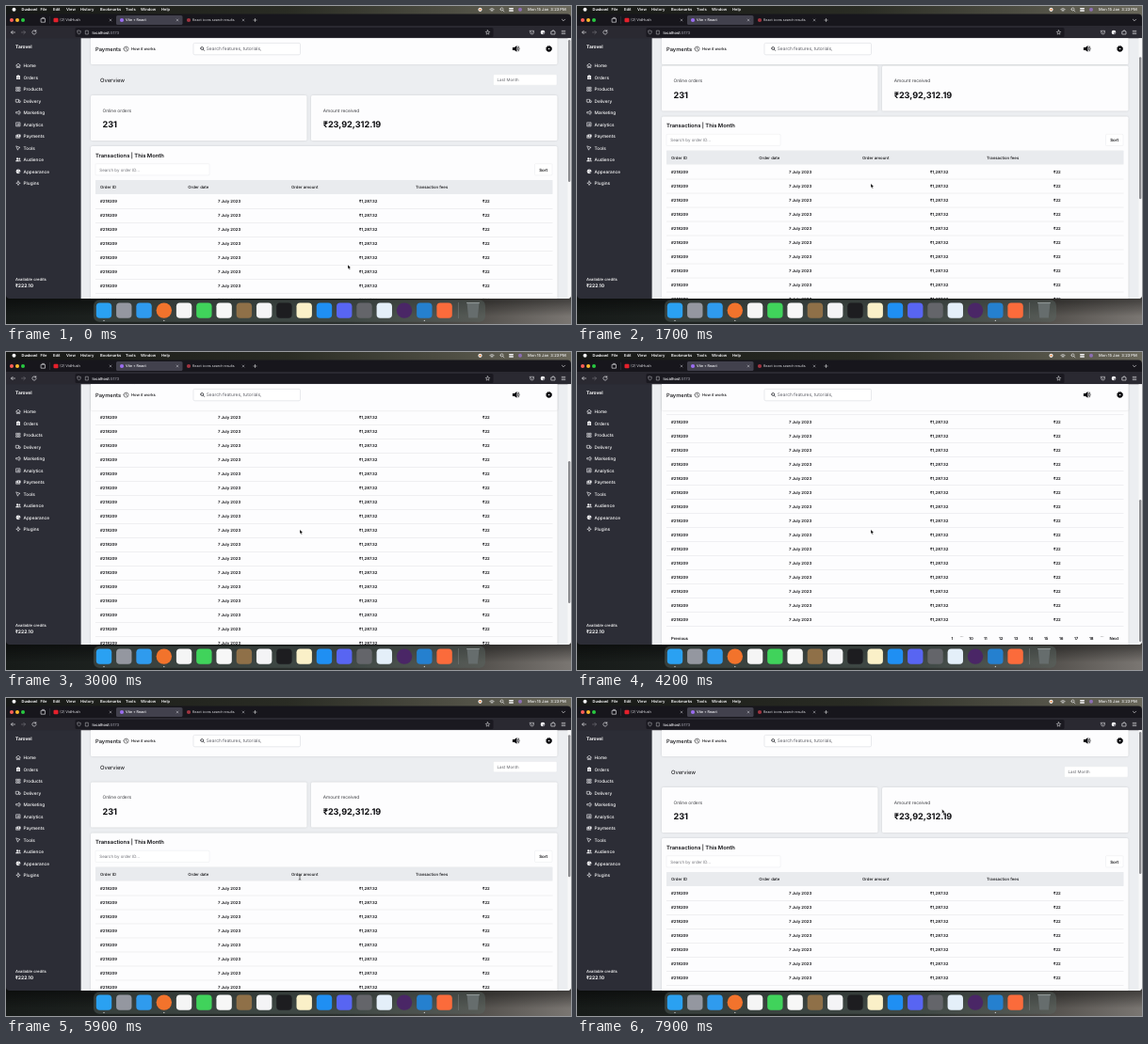
An HTML page that plays this animation: 600x338 px, repeating every 8 s.

```html
<!DOCTYPE html>
<html lang="en">
<head>
<meta charset="utf-8">
<title>Payments dashboard</title>
<style>
  html, body { margin: 0; width: 100%; height: 100%; overflow: hidden; background: #15181a; }
  svg { display: block; width: 100vw; height: 100vh; }
  text { font-family: Inter, "Noto Sans", sans-serif; text-rendering: geometricPrecision; white-space: pre; }
  .card { filter: drop-shadow(0 .5px .8px rgba(0, 0, 0, .13)); }
  .line { fill: none; stroke-linecap: round; stroke-linejoin: round; }
</style>
</head>
<body>
<svg id="stage" viewBox="0 0 600 338" preserveAspectRatio="none"></svg>
<script>
const LOOP = 8000, ROWS = 20, PITCH = 15, MAX_SCROLL = 208.7;
const DARK = '#0d0d10', PALE = '#f4f4f6';

const rect = (x, y, w, h, fill, r = 0, extra = '') =>
  `<rect x="${x}" y="${y}" width="${w}" height="${h}" rx="${r}" fill="${fill}" ${extra}/>`;
const dot = (x, y, r, fill, extra = '') => `<circle cx="${x}" cy="${y}" r="${r}" fill="${fill}" ${extra}/>`;
const line = (d, color = PALE, width = .6, x = 0, y = 0) =>
  `<path class="line" transform="translate(${x} ${y})" d="${d}" stroke="${color}" stroke-width="${width}"/>`;
const solid = (d, color = PALE, x = 0, y = 0) => `<path transform="translate(${x} ${y})" d="${d}" fill="${color}"/>`;
// Text is placed by its left edge and vertical middle.
const text = (x, y, s, size, weight = 400, fill = DARK) =>
  `<text x="${x}" y="${(y + size * .36).toFixed(2)}" font-size="${size}" font-weight="${weight}" fill="${fill}">${s}</text>`;
const ring = r => `M${-r} 0a${r} ${r} 0 1 0 ${2 * r} 0a${r} ${r} 0 1 0 ${-2 * r} 0`;
const lens = ring(1.5) + 'M1.1 1.1L2.4 2.4';
const cross = 'M-1 -1L1 1M1 -1L-1 1';

function menuBar() {
  const items = [['File', 36.5], ['Edit', 50], ['View', 64], ['History', 79], ['Bookmarks', 100],
    ['Tools', 127], ['Window', 143], ['Help', 165]];
  return rect(0, 0, 600, 10, 'url(#sky)') + dot(8.5, 3.8, 2, PALE)
    + text(16.5, 3.8, 'Duskowl', 4, 700, PALE)
    + items.map(([s, x]) => text(x, 3.8, s, 4.1, 600, PALE)).join('')
    + dot(503.5, 3.8, 2.1, PALE) + dot(503.5, 3.8, 1, '#e8833a')
    + line('M-2.2 -.6Q0 -2.4 2.2 -.6M-1.2 .5Q0 -.5 1.2 .5M0 1.5v.1', PALE, .7, 516, 4)
    + line(lens, PALE, .6, 526.5, 3.4)
    + rect(534, 2, 5, 1.6, PALE, .8) + rect(534, 4.2, 5, 1.6, PALE, .8)
    + dot(546, 3.8, 2, '#8d6fb4')
    + text(554, 3.8, 'Mon 15 Jan  3:23 PM', 4.1, 500, PALE);
}

function browserChrome() {
  const lights = ['#ff5f57', '#febc2e', '#28c840'].map((c, i) => dot(6 + i * 6, 15, 2, c)).join('');
  return rect(0, 8.5, 600, 20, '#17161c', 4) + rect(0, 21, 600, 14, '#2a2931') + lights
    + line('M-2 -1.6h4v3.8h-4zM-1 -2.6h2', PALE, .6, 39.5, 15) + rect(46.5, 11, .4, 8, '#4a4953')
    + rect(50.5, 12.7, 5, 4.6, '#e5202b', 1) + text(57, 15, '(2) VidHush', 3.9, 400, '#dedee3')
    + rect(117, 10, 70.5, 10, '#42414d', 1.6) + dot(123, 15, 2.1, '#9a6cf0')
    + text(127, 15, 'Vite + React', 3.75, 500, '#fbfbfe')
    + dot(194, 15, 2.1, '#a03440') + text(198, 15, 'React icons search results', 3.6, 400, '#dedee3')
    + [111, 182, 252].map(x => line(cross, '#d0d0d6', .45, x, 15)).join('')
    + line('M-1.6 0h3.2M0 -1.6v3.2', PALE, .5, 264.5, 15) + line('M-1.6 -.8L0 .8L1.6 -.8', PALE, .6, 592, 15)
    + line('M2 0h-4m1.7 -1.7l-1.7 1.7l1.7 1.7', PALE, .6, 7.5, 28)
    + line('M-2 0h4m-1.7 -1.7l1.7 1.7l-1.7 1.7', '#77767f', .6, 18.5, 28)
    + line('M1.6 -1.4a2.1 2.1 0 1 0 .5 1.4M1.8 -2.3v1.2h-1.2', PALE, .6, 30, 28)
    + rect(73.5, 23, 444, 10, '#1a1920', 1.6)
    + line('M0 -2l1.8 .6q0 2.6 -1.8 3.6q-1.8 -1 -1.8 -3.6z', '#c4c4ca', .5, 77.5, 28)
    + line('M-1.3 -1.8h2.6v3.8h-2.6z', '#c4c4ca', .5, 86, 28)
    + `<text x="91.5" y="29.5" font-size="4.2" font-weight="500" fill="#fbfbfe">localhost<tspan fill="#96959f">:5173</tspan></text>`
    + line('M0 -2.2L.7 -.7L2.2 -.5L1.1 .6L1.4 2.1L0 1.4L-1.4 2.1L-1.1 .6L-2.2 -.5L-.7 -.7z', PALE, .5, 511.5, 28)
    + line('M-2 -1.7h4v1.7a2 2 0 0 1 -4 0zM-.9 -.4l.9 .9l.9 -.9', PALE, .5, 558.5, 28)
    + dot(570, 28, 2.3, PALE) + dot(571, 29, 1, '#6b6a75')
    + line('M-1.8 -1h1.2a.8 .8 0 1 1 1.4 0h1.2v3h-3.8z', PALE, .6, 581, 28)
    + line('M-1.8 -1.6h3.6M-1.8 0h3.6M-1.8 1.6h3.6', PALE, .55, 592, 28);
}

function sidebar() {
  const items = [
    ['Home', line('M-2.3 -.2L0 -2.2L2.3 -.2M-1.7 -.5v2.7h1.2v-1.6h1v1.6h1.2v-2.7')],
    ['Orders', rect(-2, -1.7, 4, 4, PALE, .5) + rect(-1, -2.3, 2, 1.2, PALE, .3) + line('M-1 .2h2M-1 1.2h1.4', '#2c2d36', .4)],
    ['Products', line('M-2 -2h1.6v1.6h-1.6zM.5 -2h1.6v1.6h-1.6zM-2 .5h1.6v1.6h-1.6zM.5 .5h1.6v1.6h-1.6z')],
    ['Delivery', line('M-2.3 -1.5h2.8v2.8h-2.8zM.5 -.6h1.1l.8 .9v1h-1.9M-1.2 1.8h.1M1.4 1.8h.1')],
    ['Marketing', line('M-2 -.7h1.3l1.8 -1.4v4.2l-1.8 -1.4h-1.3zM2.1 -.7v1.4')],
    ['Analytics', line('M-2 -2h4v4h-4zM-.9 1.1v-1.1M0 1.1v-2.2M.9 1.1v-1.6')],
    ['Payments', rect(-1.7, -1.8, 4.2, 2.9, PALE, .4) + dot(.4, -.4, .7, '#2c2d36') + line('M-2.4 -.8v2.7h4')],
    ['Tools', line('M-1.9 -1.8L2 -.4L.3 .3L-.4 2z')],
    ['Audience', dot(-.9, -1, 1.1, PALE) + dot(1.3, -.8, .9, PALE) + solid('M-2.8 2q0 -1.9 1.9 -1.9t1.9 1.9zM1.4 2q0 -1 -.5 -1.6q1.9 -.3 1.9 1.6z')],
    ['Appearance', dot(0, 0, 2.4, PALE) + dot(-1, -.6, .4, '#2c2d36') + dot(.2, -1.2, .4, '#2c2d36') + dot(1.1, 1, .7, '#2c2d36')],
    ['Plugins', line('M0 -2.2L.6 -.6L2.2 0L.6 .6L0 2.2L-.6 .6L-2.2 0L-.6 -.6z')]
  ];
  return rect(0, 34.3, 80, 277, '#2c2d36') + text(10, 43.4, 'Tarovel', 4.9, 700, '#fff')
    + items.map(([s, icon], i) => {
      const y = 63.3 + i * 12.5;
      return `<g transform="translate(13 ${y})">${icon}</g>` + text(18.6, y, s, 4.72, 500, '#fff');
    }).join('')
    + text(10, 290.2, 'Available credits', 4.2, 500, '#fff') + text(10, 297.6, '₹222.10', 5, 700, '#fff');
}

function scrollingContent() {
  const card = (x, y, w, h) => rect(x, y, w, h, '#fdfdfe', 1.6, 'class="card"');
  const field = (x, y, w, h) => rect(x, y, w, h, '#fff', 1, 'stroke="#e4e5e8" stroke-width=".4"');
  const heads = [['Order ID', 100], ['Order date', 193.3], ['Order amount', 303], ['Transaction fees', 435]];
  const cells = [['#218209', 100], ['7 July 2023', 225], ['₹1,287.32', 375], ['₹22', 506]];
  const pages = [['1', 397.5], ['10', 416.3], ['11', 432], ['12', 448], ['13', 464], ['14', 479.7],
    ['15', 496], ['16', 512], ['17', 528], ['18', 544], ['Next', 565.5]];
  let out = text(100, 79, 'Overview', 5.85, 400) + field(517.5, 72.8, 67.5, 11.4)
    + text(521.5, 78.6, 'Last Month', 4.4, 400, '#65666c')
    + card(90, 95, 229.5, 48) + card(324, 95, 261.5, 48)
    + text(102.5, 111, 'Online orders', 4.8, 400, '#3c3d42') + text(102.5, 126, '231', 9.1, 700)
    + text(336.7, 111, 'Amount received', 4.8, 400, '#3c3d42') + text(336.7, 126, '₹23,92,312.19', 9.1, 700)
    + card(90, 149, 495.5, 390) + text(95, 158.6, 'Transactions | This Month', 5.8, 600)
    + field(95, 167.7, 121, 12.2) + text(99.3, 174, 'Search by order ID...', 4.45, 400, '#707178')
    + field(561.5, 167.7, 18.5, 12.2) + text(566.2, 174, 'Sort', 4.4, 600)
    + rect(95, 185, 485.5, 15, '#e9ebee', .6) + heads.map(([s, x]) => text(x, 192.4, s, 4.3, 500)).join('');
  for (let i = 0; i < ROWS; i++) {
    const y = 207.7 + i * PITCH;
    out += cells.map(([s, x]) => text(x, y, s, 4.25, 600)).join('') + rect(95, y + 7.5, 485.5, .4, '#d9dadd');
  }
  return out + text(100, 512.7, 'Previous', 4.25, 600)
    + pages.map(([s, x]) => text(x, 512.7, s, 4.25, 600)).join('')
    + [406.5, 555.5].map(x => text(x, 510.3, '...', 4.4, 500)).join('');
}

function pageHeader() {
  return rect(90, 30, 495.5, 32, '#fdfdfe', 1.6, 'class="card"') + text(95, 45.8, 'Payments', 5.75, 500)
    + line(ring(2.5) + 'M0 -1.5v1.6l1 .6', DARK, .5, 127.5, 45.6) + text(133, 45.8, 'How it works', 4.15, 500)
    + rect(199, 39.4, 113.5, 12.4, '#fff', 1.4, 'stroke="#d3d4da" stroke-width=".5"')
    + line(lens, '#34353c', .8, 208.2, 45) + text(212.7, 45.7, 'Search features, tutorials,', 4.85, 400, '#5c5d65')
    + solid('M-3.4 -1.5h2L1.2 -3.4v6.8L-1.4 1.5h-2z', DARK, 541.3, 45.4)
    + line('M2 -1.6q1.2 1.6 0 3.2M3 -2.6q1.9 2.6 0 5.2', DARK, .7, 541.3, 45.4)
    + dot(576.6, 45.5, 2.9, DARK, `stroke="${DARK}" stroke-dasharray="1.2 1.08"`) + dot(576.6, 45.5, .8, '#fff');
}

function dock() {
  const apps = ['#2aa1f2', '#9497a0', '#2f9bee', '#f2732c', '#f5f5f5', '#40d35b', '#f7f7f7', '#8f7048', '#f4f4f6',
    '#1d1d20', '#faf0c8', '#1f8ff3', '#5865f2', '#64656a', '#e4eff9', '#4a2666', '#2580cf', '#fb6b3b'];
  const round = [3, 15];
  return rect(93, 312.5, 416, 23.3, '#5a6662', 6, 'opacity=".45"')
    + apps.map((c, i) => {
      const x = 104 + i * 21.27;
      return round.includes(i) ? dot(x, 323.6, 8.2, c) : rect(x - 8.2, 315.4, 16.4, 16.4, c, 3.8);
    }).join('')
    + [0, 3, 16].map(i => dot(104 + i * 21.27, 334.4, .6, '#d8d8d8')).join('')
    + rect(480.5, 315, .4, 17, '#8a8f8d')
    + solid('M-6.5 -8h13l-1.7 16h-9.6z', '#666d6d', 496, 323.6)
    + line('M-6.5 -8h13', '#a5abab', .8, 496, 323.6);
}

document.getElementById('stage').innerHTML = `
  <defs>
    <linearGradient id="sky"><stop stop-color="#161816"/><stop offset=".5" stop-color="#2a2c24"/><stop offset="1" stop-color="#69675a"/></linearGradient>
    <linearGradient id="ground"><stop stop-color="#171b19"/><stop offset=".6" stop-color="#2b312e"/><stop offset=".82" stop-color="#504d49"/><stop offset="1" stop-color="#7a7672"/></linearGradient>
    <linearGradient id="shade" x2="0" y2="1"><stop stop-opacity=".6"/><stop offset="1" stop-opacity="0"/></linearGradient>
    <clipPath id="window"><rect y="20" width="600" height="291" rx="4"/></clipPath>
    <clipPath id="view"><rect x="79.6" y="34.3" width="521" height="277"/></clipPath>
  </defs>
  ${rect(0, 0, 600, 338, 'url(#ground)')}
  ${rect(0, 306, 600, 24, 'url(#shade)')}
  ${menuBar()}${browserChrome()}
  <g clip-path="url(#window)">
    ${sidebar()}
    <g clip-path="url(#view)">
      ${rect(79, 34, 521, 278, '#eceef1')}
      <g id="content">${scrollingContent()}</g>
      ${pageHeader()}
      ${rect(596.5, 34, 3.5, 278, '#f7f7f8')}
      <rect id="thumb" x="597" y="36" width="2.4" height="151" rx="1.2" fill="#8c8c90"/>
    </g>
  </g>
  ${dock()}
  <g id="cursor">
    <path id="arrow" d="M0 0v4.5l1 -.9l.7 1.6l.8 -.3l-.7 -1.6h1.4z" fill="#000" stroke="#fff" stroke-width=".35"/>
    <g id="beam">${line('M-.9 -.2q.9 0 .9 .6q0 -.6 .9 -.6M0 .4v3.6M-.9 4.5q.9 0 .9 -.6q0 .6 .9 .6', '#111', .5)}</g>
  </g>`;

const [content, thumb, cursor, arrow, beam] =
  ['content', 'thumb', 'cursor', 'arrow', 'beam'].map(id => document.getElementById(id));

// Smooth 0 to 1 progress between two times.
function ease(t, start, end) {
  const u = Math.min(1, Math.max(0, (t - start) / (end - start)));
  return u * u * (3 - 2 * u);
}

function draw(now) {
  const t = now % LOOP;
  const scroll = 138 * ease(t, 1120, 3000) + (MAX_SCROLL - 138) * ease(t, 3350, 4150)
    - MAX_SCROLL * ease(t, 4500, 6050);
  const arrive = ease(t, 0, 620), leave = ease(t, 6500, 7700);
  const x = 363 - 51 * arrive + 75.7 * leave;
  const y = 275 - 86.3 * arrive - 70.5 * leave;
  const overText = t > 5820 && t < 6200;
  content.setAttribute('transform', `translate(0 ${-scroll})`);
  thumb.setAttribute('transform', `translate(0 ${scroll * .58})`);
  cursor.setAttribute('transform', `translate(${x} ${y})`);
  arrow.style.display = overText ? 'none' : '';
  beam.style.display = overText ? '' : 'none';
  requestAnimationFrame(draw);
}
requestAnimationFrame(draw);
</script>
</body>
</html>
```
